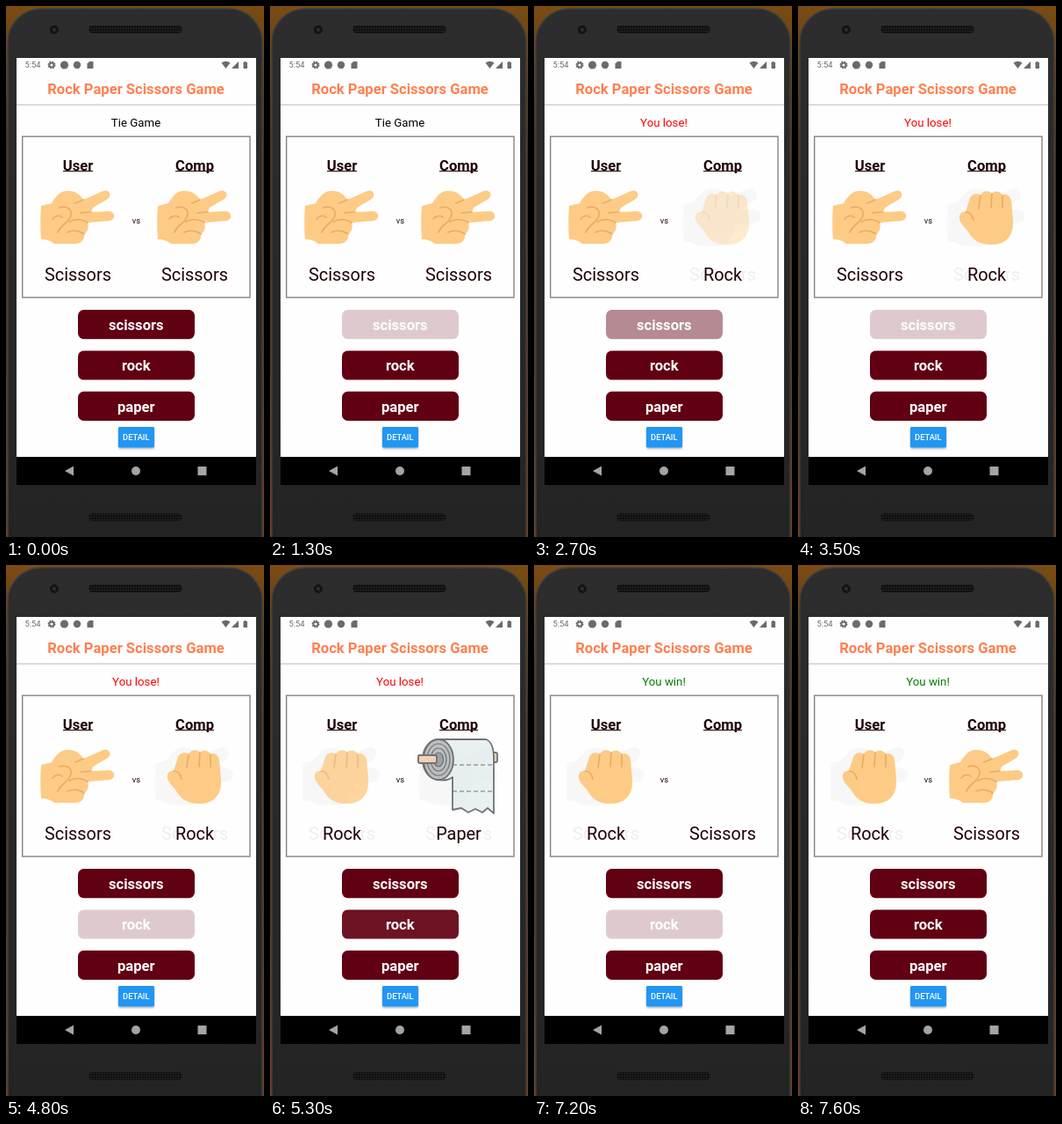
Write an HTML page that moves like this. It is 294 px wide and 603 px high and loops after 8000 ms.

```html
<!DOCTYPE html>
<html lang="en">
<head>
<meta charset="utf-8">
<title>Rock Paper Scissors Game</title>
<style>
  html, body { margin: 0; width: 100%; height: 100%; overflow: hidden; background: #2a2a2a; }
  svg { display: block; width: 294px; height: 603px; }
  text { font-family: Roboto, Arial, sans-serif; text-anchor: middle; }
  .big { font-size: 16.6px; font-weight: 700; }
  .name { font-size: 19.9px; }
  .small { font-size: 9.3px; }
  .ink { fill: #200005; }
  .crease { fill: none; stroke: #e9ad66; stroke-width: 1.7; stroke-linecap: round; }
  .ghost { fill: #f7f7f7; stroke: #f7f7f7; stroke-width: 5; stroke-linejoin: round; }
  .ghostText { fill: #f0eeef; }
</style>
</head>
<body>
<svg viewBox="0 0 294 603">
  <defs>
    <linearGradient id="wall" x2="0" y2="1">
      <stop offset="0" stop-color="#7a4c14"/>
      <stop offset=".3" stop-color="#4a2a12"/>
      <stop offset="1" stop-color="#75401f"/>
    </linearGradient>
    <linearGradient id="shell" x2="0" y2="1">
      <stop offset="0" stop-color="#2d2d2d"/>
      <stop offset="1" stop-color="#232323"/>
    </linearGradient>
    <pattern id="mesh" width="3" height="3" patternUnits="userSpaceOnUse">
      <rect width="3" height="3" fill="#111"/>
      <circle cx="1.5" cy="1.5" r=".8" fill="#2c2c2c"/>
    </pattern>
    <filter id="shade" x="-20%" y="-20%" width="140%" height="160%">
      <feDropShadow dx="0" dy="1.2" stdDeviation="1" flood-opacity=".35"/>
    </filter>

    <path id="scissorsShape" d="M1 18L13 15C18 6 24 0 32 1C39 1 45 4 49 11L72 1C79-1 82 6 77 10L60 20L58 25L79 24C86 25 86 34 79 35L54 37C56 42 54 48 50 50C51 57 46 61 40 61H16C12 58 8 56 1 56C0 44 0 30 1 18Z"/>
    <path id="rollShape" d="M24 2H78C84 4 87 12 87 24V86L80 80L74 85L66 81L58 85L50 80L40 82V45C36 48 30 49 24 48C12 47 6 36 6 25C6 12 14 2 24 2Z"/>

    <g id="scissors">
      <use href="#scissorsShape" fill="#fdcb85"/>
      <path class="crease" d="M49 11L40 15M58 25L46 26M22 20C31 17 38 23 34 31C31 38 23 40 20 48M33 36C40 32 49 33 54 37M31 48C37 45 45 46 50 50M25 31C22 28 17 29 14 33"/>
    </g>
    <g id="rock">
      <path fill="#fdcb85" d="M1 33C0 27 4 24 8 25L13 9C15 4 22 3 25 6C27 0 36 0 38 4C41 0 48 1 50 6C54 3 59 7 60 12L62 34C63 50 56 62 38 62C22 62 16 56 10 46C6 41 2 38 1 33Z"/>
      <path class="crease" d="M25 6L23 21M38 4L37 20M50 6L50 20M8 25C13 25 16 29 17 34"/>
    </g>
    <g id="paper" stroke="#363b3e" stroke-width="1.8" stroke-linejoin="round">
      <rect x="1" y="20" width="14" height="9" rx="2" fill="#f2bd91"/>
      <rect x="82" y="17" width="9" height="11" rx="2" fill="#f2bd91"/>
      <use href="#rollShape" fill="#e0ebec"/>
      <ellipse cx="24" cy="25" rx="17" ry="23" fill="#a1a6a9"/>
      <g fill="none" stroke-width="1.2">
        <ellipse cx="24" cy="25" rx="13" ry="18"/>
        <ellipse cx="24" cy="25" rx="9" ry="13"/>
        <ellipse cx="24" cy="25" rx="5.5" ry="8" fill="#777d80"/>
        <path d="M40 31H87M40 61H87" stroke-dasharray="5 3"/>
      </g>
      <rect x="1" y="20" width="21" height="9" rx="2" fill="#f2bd91"/>
    </g>
  </defs>

  <rect width="294" height="603" fill="url(#wall)"/>
  <rect x="2" y="3" width="290" height="640" rx="38" fill="url(#shell)" stroke="#404040" stroke-width="1.5"/>
  <rect x="94" y="22" width="107" height="9" rx="4.5" fill="url(#mesh)"/>
  <rect x="94" y="576" width="107" height="9" rx="4.5" fill="url(#mesh)"/>
  <circle cx="55" cy="27" r="5" fill="#141414"/>
  <circle cx="55" cy="27" r="2" fill="#2b3038"/>

  <rect x="12" y="59" width="273" height="453" fill="#fefefe"/>
  <g fill="#6b6b6b">
    <text class="small" x="30.5" y="70.3">5:54</text>
    <circle cx="52" cy="67" r="2.6" fill="none" stroke="#6b6b6b" stroke-width="2"/>
    <circle cx="52" cy="67" r="3.9" fill="none" stroke="#6b6b6b" stroke-width="1.2" stroke-dasharray="1.7 1.36"/>
    <circle cx="66.5" cy="67" r="4.6"/>
    <circle cx="81" cy="67" r="4.2"/>
    <path d="M92.5 65.5L95 63H99.500V71H92.5Z"/>
    <path d="M245.500 64.5Q250.500 61 255.500 64.5L250.500 71Z"/>
    <path d="M265 63V71H257Z"/>
    <path d="M270.500 64H271.500V63H273.500V64H275V71H270.500Z"/>
  </g>
  <text class="big" x="148" y="100" fill="#ff7f50">Rock Paper Scissors Game</text>
  <rect x="12" y="111.500" width="273" height="1.500" fill="#d0d0d0"/>
  <text id="msg" x="148" y="137" font-size="13.28"></text>
  <rect x="18.700" y="148.200" width="259.300" height="182.800" fill="none" stroke="#858585" stroke-width="1.400"/>

  <g class="big ink">
    <text x="82" y="186.500">User</text>
    <text x="215" y="186.500">Comp</text>
    <path d="M65 187.500H99M193 187.500H237" stroke="#200005"/>
  </g>
  <text class="small ink" x="148.300" y="246.700">vs</text>
  <g id="players"></g>
  <g id="buttons"></g>

  <rect x="128" y="478" width="41" height="23.500" rx="1.400" fill="#2196f3" filter="url(#shade)"/>
  <text class="small" x="148.300" y="493.200" font-weight="500" fill="#fff">DETAIL</text>

  <rect x="12" y="512" width="273" height="32" fill="#000"/>
  <g fill="#a4a4a4">
    <path d="M67 528L77 522.500V533.500Z"/>
    <circle cx="148" cy="528" r="5"/>
    <rect x="218.500" y="523" width="10" height="10"/>
  </g>
</svg>

<script>
const LOOP = 8000;
const $ = id => document.getElementById(id);

// Each row: start time, then the values held until the next row.
const rounds = [
  [0, 'Tie Game', '#000', 'scissors', 'scissors', '', ''],
  [1400, 'Tie game!', '#000', 'scissors', 'scissors', '', ''],
  [2500, 'You lose!', '#f00', 'scissors', 'rock', '', 'scissors'],
  [5100, 'You lose!', '#f00', 'rock', 'paper', 'scissors', 'scissors'],
  [7200, 'You win!', '#008000', 'rock', 'scissors', 'scissors', 'paper']
];
const ramp = (start, ...levels) => levels.map((v, i) => [start + i * 100, v]);
const press = (at, release, ...levels) => [[at, .2], ...ramp(release, ...levels)];
const buttonFade = {
  scissors: [[0, 1], ...press(1300, 1500, .45, .8, 1), ...press(2300, 2700, .45, .8, 1), ...press(3500, 3800, .45, .8, 1)],
  rock: [[0, 1], ...press(4800, 5100, .35, .65, .92, 1), ...press(6000, 6300, .45, .8, 1), ...press(7100, 7300, .35, .65, .92, 1)],
  paper: [[0, 1]]
};
const handFade = [
  [[0, 1], ...ramp(5100, 0, .4, .8, 1)],
  [[0, 1], ...ramp(2500, 0), ...ramp(2700, .4, .75, 1), ...ramp(5100, 0, .35, .7, 1), ...ramp(7200, 0, .3, .6, .9, 1)]
];
const handPos = { scissors: [-43, 209], rock: [-32, 209], paper: [-47, 196] };
const label = s => s && s[0].toUpperCase() + s.slice(1);
const rowAt = (rows, t) => rows.filter(r => r[0] <= t).pop();

$('buttons').innerHTML = Object.keys(buttonFade).map((name, i) => {
  const y = 345 + i * 46.4;
  return `<g id="btn-${name}"><rect x="82" y="${y}" width="133" height="33.2" rx="6.6" fill="#610012"/>
    <text class="big" x="148.3" y="${y + 22.8}" fill="#fff">${name}</text></g>`;
}).join('');

const place = (href, name, x, cls) => {
  const [dx, y] = handPos[name];
  return `<use href="#${href}" class="${cls}" transform="translate(${x + dx} ${y})"/>`;
};

function player(x, hand, old) {
  let back = '';
  if (old) {
    back = place(old + 'Shape', old, x, 'ghost');
    if (old === 'scissors') back += `<text class="name ghostText" x="${x}" y="312">${label(old)}</text>`;
  }
  return back + place(hand, hand, x, 'hand') +
    `<text class="name ink" x="${x}" y="312">${label(hand)}</text>`;
}

let shown;
function draw(t) {
  const round = rowAt(rounds, t);
  if (round !== shown) {
    shown = round;
    const [, text, color, user, comp, oldUser, oldComp] = round;
    $('msg').textContent = text;
    $('msg').setAttribute('fill', color);
    $('players').innerHTML = player(82, user, oldUser) + player(215, comp, oldComp);
  }
  document.querySelectorAll('.hand').forEach((el, i) => {
    el.setAttribute('opacity', rowAt(handFade[i], t)[1]);
  });
  for (const name in buttonFade) {
    $('btn-' + name).setAttribute('opacity', rowAt(buttonFade[name], t)[1]);
  }
}

const start = performance.now();
function tick() {
  draw((performance.now() - start) % LOOP);
  requestAnimationFrame(tick);
}
tick();
</script>
</body>
</html>
```
